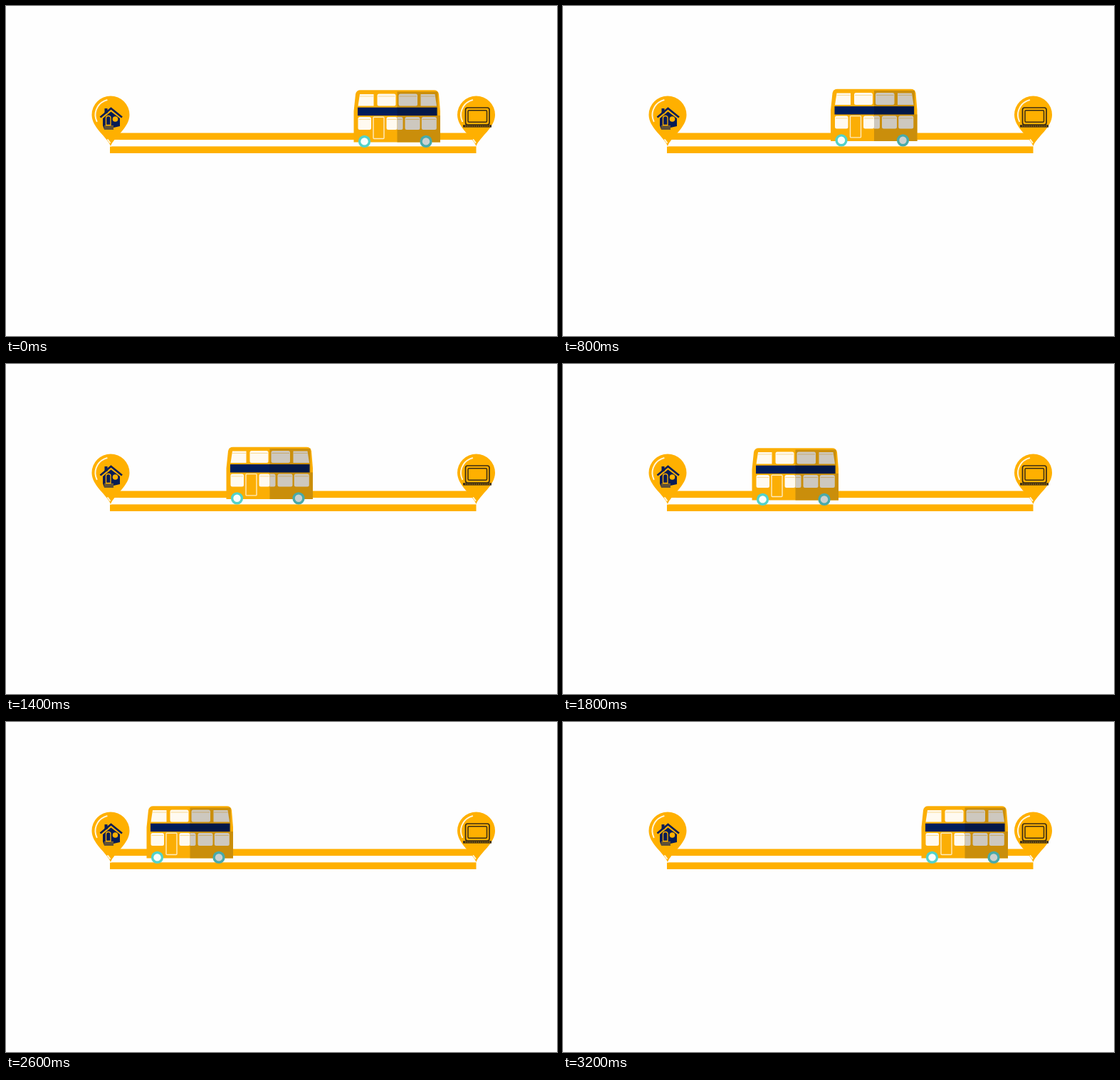
These frames come from a looping animation (774 by 464 pixels, 3300 ms). An HTML page with a canvas:

```html
<!DOCTYPE html>
<html lang="en">
<head>
<meta charset="utf-8">
<title>Bus ride</title>
<style>
html, body { margin: 0; width: 100%; height: 100%; overflow: hidden; background: #fefefe; }
canvas { display: block; width: 774px; height: 464px; filter: blur(0.5px); }
</style>
</head>
<body>
<canvas id="stage" width="774" height="464"></canvas>
<script>
const ctx = document.getElementById('stage').getContext('2d');
const LOOP = 3300, STEP = 100, STEPS = LOOP / STEP;
const AMBER = '#ffb000', NAVY = '#061c55', CREAM = '#fffaf0', INK = '#3b2d14';

// Step number and left edge of the bus; counted from the departure
const route = [[0, 503], [1, 488], [5, 428], [9, 375.5], [15, 309], [19, 265], [27, 197], [32, 163]];

function busX(n) {
  let i = 1;
  while (i < route.length - 1 && n > route[i][0]) i++;
  const [a, xa] = route[i - 1], [b, xb] = route[i];
  return xa + (xb - xa) * (n - a) / (b - a);
}

function busY(n) {
  const phase = n / 6.6 % 1;
  return phase > 0.2 && phase < 0.8 ? 116.4 : 118;
}

function rect(x, y, w, h, color) {
  ctx.fillStyle = color;
  ctx.fillRect(x, y, w, h);
}

function round(x, y, w, h, r) {
  ctx.beginPath();
  ctx.roundRect(x, y, w, h, r);
}

function fill(color) {
  ctx.fillStyle = color;
  ctx.fill();
}

function stroke(color, width) {
  ctx.strokeStyle = color;
  ctx.lineWidth = width;
  ctx.stroke();
}

function poly(points) {
  ctx.beginPath();
  points.forEach(([x, y]) => ctx.lineTo(x, y));
}

function disc(x, y, r, color) {
  ctx.beginPath();
  ctx.arc(x, y, r, 0, Math.PI * 2);
  fill(color);
}

function pin(x) {
  ctx.save();
  ctx.translate(x, 153);
  ctx.beginPath();
  ctx.moveTo(0, 44);
  ctx.bezierCurveTo(-5, 31, -26.5, 18, -26.5, 0);
  ctx.arc(0, 0, 26.5, Math.PI, 0);
  ctx.bezierCurveTo(26.5, 18, 5, 31, 0, 44);
  fill(AMBER);
  ctx.lineCap = 'round';
  ctx.beginPath();
  ctx.arc(0, 0, 21.5, Math.PI * 0.86, Math.PI * 1.42);
  stroke('#fff6df', 2);
  poly([[-4, 35], [-1, 39]]);
  stroke('#fff6df', 2);
  ctx.restore();
}

function house() {
  rect(138.5, 144, 4, 7, NAVY);
  poly([[132.5, 156.5], [147.5, 144], [163, 156.5]]);
  stroke(NAVY, 2.6);
  poly([[136, 158], [147.5, 148.5], [160, 158], [160, 169], [151, 171], [151, 173.5], [138, 173.5], [136, 168]]);
  ctx.closePath();
  fill(NAVY);
  round(140.5, 154.5, 6.5, 13, [3, 3, 0, 0]);
  stroke(AMBER, 1.3);
  disc(153.5, 159, 3.8, AMBER);
  rect(138, 168.5, 13, 1, AMBER);
  rect(138, 171, 13, 0.8, AMBER);
}

function laptop() {
  round(645.5, 143, 33.5, 24, 3);
  stroke(INK, 1.7);
  round(649, 146.8, 26.5, 16.5, 1.5);
  stroke(INK, 1.5);
  rect(642, 167.2, 40, 3.4, INK);
  for (let x = 645; x < 680; x += 3) rect(x, 168.6, 1.6, 0.7, AMBER);
}

function pane(x, y, w, h, shaded) {
  round(x, y, w, h, 2.5);
  fill(shaded ? '#cdc8bf' : CREAM);
  rect(x + 1, y + 3, w - 2, 0.9, shaded ? '#c8a866' : '#f8d587');
}

function wheel(x, shaded) {
  disc(x, 72.4, 8.6, shaded ? '#48aaa9' : '#52d2ca');
  disc(x, 72.4, 5.2, shaded ? '#cbd1d0' : '#fbfdfc');
}

function bodyPath() {
  ctx.beginPath();
  ctx.moveTo(0.5, 73.5);
  ctx.lineTo(0.5, 30);
  ctx.lineTo(3, 6);
  ctx.quadraticCurveTo(4, 0.3, 10, 0.3);
  ctx.lineTo(113, 0.3);
  ctx.quadraticCurveTo(119, 0.3, 120, 6);
  ctx.lineTo(122, 30);
  ctx.lineTo(122, 73.5);
  ctx.closePath();
}

function bus(x, y) {
  ctx.save();
  ctx.translate(x, y);
  bodyPath();
  fill('#fbae05');
  ctx.save();
  ctx.clip();
  rect(61.5, 2.5, 57, 34, '#ca8e0b');
  rect(61.5, 36, 61, 38, '#ca8e0b');
  ctx.restore();

  poly([[9, 6], [28.5, 6], [28.5, 22.5], [6.5, 22.5]]);
  ctx.closePath();
  fill(CREAM);
  rect(9, 8.5, 19, 0.9, '#f8d587');
  pane(33.5, 5.5, 26, 17, false);
  pane(63.5, 5.5, 26.5, 17, true);
  poly([[94.5, 6], [114.5, 6], [117, 22.5], [94.5, 22.5]]);
  ctx.closePath();
  fill('#cdc8bf');
  rect(95, 8.5, 19.5, 0.9, '#c8a866');

  rect(6, 24.7, 56, 11.4, '#001d5c');
  rect(61.5, 24.7, 56, 11.4, '#031848');

  pane(6.5, 38, 18.5, 18, false);
  pane(46.5, 38, 15, 18, false);
  ctx.save();
  ctx.beginPath();
  ctx.rect(61.5, 36, 9, 22);
  ctx.clip();
  pane(46.5, 38, 23, 18, true);
  ctx.restore();
  pane(72.5, 38, 21, 18, true);
  pane(95.8, 38, 21, 18, true);
  round(28, 38.2, 15, 30.3, 1);
  stroke('#ffecc0', 1.4);

  wheel(15.5, false);
  wheel(102, true);
  ctx.restore();
}

function draw(ms) {
  const n = (Math.floor(ms % LOOP / STEP) + 1) % STEPS;
  rect(0, 0, 774, 464, '#fefefe');
  rect(150, 178.5, 508, 9.6, AMBER);
  rect(146, 197.4, 514.5, 9.6, AMBER);
  // Pale gap between the upper rail and the pin tips
  poly([[140, 197.4], [140, 188.1], [160, 188.1], [148, 197.4]]);
  fill('#fefefe');
  pin(147);
  pin(660.5);
  house();
  laptop();
  bus(busX(n), busY(n));
}

const start = performance.now();
function tick() {
  draw(performance.now() - start);
  requestAnimationFrame(tick);
}
tick();
</script>
</body>
</html>
```
